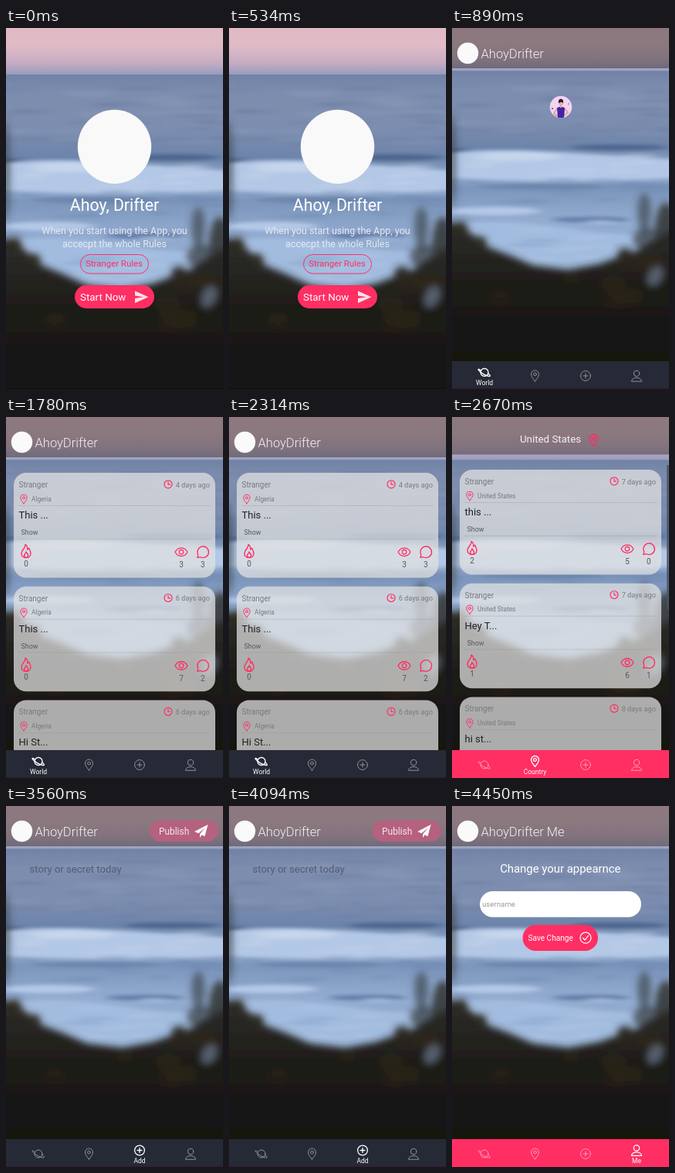
An HTML page for the animation above (5.34 s loop, 281 px wide and 466 px high).

```html
<!DOCTYPE html>
<html lang="en">
<head>
<meta charset="utf-8">
<title>App tour</title>
<style>
  html, body { margin: 0; width: 100%; height: 100%; overflow: hidden; background: #15130f; }
  svg { display: block; width: 100vw; height: 100vh; }
  text { font-family: Roboto, "Open Sans", sans-serif; }
</style>
</head>
<body>
<svg id="stage" viewBox="0 0 281 466" xmlns="http://www.w3.org/2000/svg">
  <defs>
    <linearGradient id="sky" x1="0" y1="0" x2="0" y2="1">
      <stop offset="0" stop-color="#e0b9c3"/>
      <stop offset=".35" stop-color="#e0bbc6"/>
      <stop offset=".7" stop-color="#c9aec3"/>
      <stop offset="1" stop-color="#939abd"/>
    </linearGradient>
    <linearGradient id="sea" x1="0" y1="0" x2="0" y2="1">
      <stop offset="0" stop-color="#7082a6"/>
      <stop offset=".08" stop-color="#7d8dae"/>
      <stop offset=".24" stop-color="#7d8eb0"/>
      <stop offset=".37" stop-color="#6d84aa"/>
      <stop offset=".47" stop-color="#98afd0"/>
      <stop offset=".58" stop-color="#7e97bd"/>
      <stop offset=".72" stop-color="#93acd0"/>
      <stop offset="1" stop-color="#8ca6cc"/>
    </linearGradient>
    <linearGradient id="land" x1="0" y1="0" x2="0" y2="1">
      <stop offset="0" stop-color="#2e2d2a"/>
      <stop offset=".35" stop-color="#1f1d19"/>
      <stop offset=".7" stop-color="#151412"/>
      <stop offset="1" stop-color="#121110"/>
    </linearGradient>
    <filter id="soft" filterUnits="userSpaceOnUse" x="-60" y="-20" width="400" height="540">
      <feGaussianBlur stdDeviation="7 2.2"/>
    </filter>
    <filter id="haze" filterUnits="userSpaceOnUse" x="-60" y="-20" width="400" height="560">
      <feGaussianBlur stdDeviation="5"/>
    </filter>
    <clipPath id="disc"><circle cx="141" cy="102" r="14"/></clipPath>
    <g id="photo"></g>
  </defs>
  <g id="scenes"></g>
</svg>
<script>
const HOLD = 890;
const PINK = '#ff2e63', NAVY = '#252a36';
const BRAND = 'AhoyDrifter';

const text = (x, y, size, str, fill = '#fff', more = '') =>
  `<text x="${x}" y="${y}" font-size="${size}" fill="${fill}" ${more}>${str}</text>`;
const mid = 'text-anchor="middle"', end = 'text-anchor="end"', thin = 'font-weight="300"';
const rect = (x, y, w, h, fill, r = 0, more = '') =>
  `<rect x="${x}" y="${y}" width="${w}" height="${h}" rx="${r}" fill="${fill}" ${more}/>`;
const oval = (x, y, rx, ry, fill, more = '') =>
  `<ellipse cx="${x}" cy="${y}" rx="${rx}" ry="${ry}" fill="${fill}" ${more}/>`;

// Icons are centred on 0,0
const shapes = {
  planet: '<circle r="5"/><path d="M-4.6-2.4C-7.5-4.6-8.6-4.6-7.6-2.8C-6-.2 1.5 4.4 5.6 5C8.4 5.4 7.6 3.4 4.8 1.2"/>',
  pin: '<path d="M0 7C-2.2 3.8-5 1.2-5-2A5 5 0 0 1 5-2C5 1.2 2.2 3.8 0 7Z"/><circle cy="-2" r="1.9"/>',
  add: '<circle r="6.4"/><path d="M-3 0H3M0-3V3"/>',
  user: '<circle cy="-3" r="3.7"/><path d="M-6.5 6.8C-6.5 1 6.5 1 6.5 6.8Z"/>',
  clock: '<circle r="5"/><path d="M0-3V.3H2.5"/>',
  fire: '<path d="M-1-8.5C0-4-6-2-6 3.2C-6 6.6-3.2 8.6 0 8.6S6 6.6 6 3C6 .2 4.4-1.4 3.8-3.6C3-2.6 2.4-2.2 1.8-1.8C2.2-5 1-7.4-1-8.5Z"/><path d="M0 1C.4 3-2.4 3.4-2.4 5.8C-2.4 7.4-1.2 8.4 0 8.4S2.6 7.4 2.6 5.6C2.6 3.6.8 3 0 1Z"/>',
  eye: '<path d="M-8 0C-4.5-7 4.5-7 8 0C4.5 7-4.5 7-8 0Z"/><circle r="2.8"/>',
  chat: '<path d="M-7 7.4L-6 3.6A7.3 7.3 0 1 1-3.2 6.4Z"/>',
  check: '<circle r="7"/><path d="M-3.4.2L-1 2.8L3.6-2.8"/>'
};
const icon = (name, x, y, color, scale = 1, weight = 1.2) =>
  `<g transform="translate(${x} ${y}) scale(${scale})" fill="none" stroke="${color}" stroke-width="${weight}" stroke-linejoin="round" stroke-linecap="round">${shapes[name]}</g>`;

function photo() {
  let seed = 11;
  const rnd = (a, b) => a + (b - a) * ((seed = seed * 16807 % 2147483647) / 2147483647);
  const streaks = (n, y0, y1, color, rx0, rx1, ry, alpha) => {
    let s = '';
    for (let i = 0; i < n; i++)
      s += oval(rnd(-10, 290), rnd(y0, y1), rnd(rx0, rx1), rnd(ry / 2, ry), color, `opacity="${alpha}"`);
    return s;
  };
  const water =
    streaks(26, 76, 160, '#627599', 12, 40, 2.2, .38) +
    streaks(20, 70, 150, '#98a6c4', 12, 40, 2, .34) +
    oval(8, 173, 22, 4, '#435a80') + oval(215, 167, 62, 4, '#4d658d') +
    // foam bands sag slightly to the right
    `<path fill="#b3c8e6" d="M-30 178Q40 168 110 172T310 186V208Q150 220-30 208Z"/>` +
    oval(85, 180, 55, 6, '#c6d6ec') +
    oval(120, 222, 90, 4, '#6b84ab') + oval(250, 222, 55, 5, '#7690b7') +
    oval(55, 256, 60, 6, '#b4c8e6') + oval(180, 268, 50, 4, '#5f7ba5') +
    `<path fill="#a2bcdf" d="M-30 274Q70 266 150 280T310 286V345H-30Z"/>` +
    streaks(12, 178, 206, '#c3d3ea', 10, 32, 3, .5) +
    streaks(14, 212, 245, '#6984ac', 10, 34, 2.5, .4) +
    streaks(14, 250, 325, '#b5cae8', 10, 32, 3, .45) +
    streaks(10, 262, 315, '#7692ba', 10, 30, 2.5, .4);
  const growth =
    oval(0, 185, 5, 65, '#38434b', 'opacity=".7"') +
    oval(249, 258, 9, 27, '#414c55', 'opacity=".75"') +
    oval(277, 278, 14, 34, '#343938', 'opacity=".9"') +
    oval(254, 295, 20, 15, '#363a3b', 'opacity=".7"') +
    `<path fill="url(#land)" d="M-30 270L8 272L24 286L46 306L75 318L105 332L150 338L190 330L214 321L238 312L256 300L281 284L310 276V520H-30Z"/>` +
    oval(12, 280, 8, 10, '#2d2a24') + oval(36, 300, 9, 9, '#2c2920') +
    oval(224, 316, 10, 8, '#2b2b28') +
    streaks(9, 325, 385, '#33291a', 10, 26, 12, .4) +
    oval(263, 347, 9, 14, '#7a8ba4', 'opacity=".6" transform="rotate(25 263 347)"');
  return rect(0, 0, 281, 62, 'url(#sky)') +
    rect(0, 60, 281, 290, 'url(#sea)') +
    `<g filter="url(#soft)">${water}</g><g filter="url(#haze)">${growth}</g>`;
}

const tabs = [['planet', 42, 'World'], ['pin', 107.5, 'Country'], ['add', 173, 'Add'], ['user', 239, 'Me']];
function tabBar(active, pink) {
  const idle = pink ? '#ff9db5' : '#8d929c';
  return rect(0, 430, 281, 36, pink ? PINK : NAVY) +
    (pink ? '' : rect(0, 465, 281, 1, '#38182f')) +
    tabs.map(([name, x, label], i) => i === active
      ? icon(name, x, 444.5, '#fff', 1, 1.3) + text(x, 461, 8.5, label, '#fff', mid)
      : icon(name, x, 449, idle, 1, 1)).join('');
}

const backdrop = (h = 52) => '<use href="#photo" transform="scale(1 .923)"/>' +
  rect(0, 0, 281, h, '#3a383a', 0, 'opacity=".5"') +
  (h > 50 ? rect(0, 52, 281, 2, '#a3acc4', 0, 'opacity=".6"') : '');
const brandBar = (suffix = '') =>
  oval(20.5, 32.5, 13.7, 13.7, '#fafafa') + text(37.5, 38.5, 16.5, BRAND + suffix, '#f4f1f3', thin);

function card(y, place, age, title, fires, views, replies) {
  const grey = '#777a7e', dark = '#55585c';
  const line = dy => rect(16, dy, 249, .7, '#8d9093', 0, 'opacity=".45"');
  return `<g transform="translate(0 ${y})">` +
    rect(10, 0, 261, 135.5, '#e2e2e2', 16, 'opacity=".74"') +
    text(16.5, 19, 10, 'Stranger', grey) +
    icon('clock', 210, 14.8, PINK) +
    text(264, 18.5, 9.2, age, grey, end) +
    icon('pin', 23, 34, PINK, .82) +
    text(33, 36.5, 8.3, place, grey) + line(42) +
    text(16.5, 59, 13, title, '#202226') +
    text(19.5, 80.3, 8.9, 'Show', dark) + line(85) +
    icon('fire', 26, 101, PINK, 1, 1.4) +
    icon('eye', 227, 102.3, PINK, 1, 1.3) +
    icon('chat', 254.8, 102.3, PINK, 1, 1.3) +
    text(26, 120.5, 10, fires, dark, mid) +
    text(227, 122, 10, views, dark, mid) +
    text(254.8, 122, 10, replies, dark, mid) + '</g>';
}
const feed = (top, place, rows) =>
  rows.map((row, i) => card(top + i * 146.7, place, ...row)).join('');

const avatar = oval(141, 102, 14.3, 14.3, '#f3d4f1') + `<g clip-path="url(#disc)">
  <path d="M136 104L132 110L137 115M146 104L150 109L145 113" fill="none" stroke="#dda596" stroke-width="2"/>
  <path d="M136 103Q141 100 146 103L145 117H137Z" fill="#4322a8"/>
  <rect x="139.8" y="98" width="2.5" height="5" fill="#dda596"/>
  <circle cx="141" cy="97" r="2.8" fill="#e3ad9e"/>
  <path d="M138 97Q137 92 141 91.5Q145 92 144 97Q142 94 138 97Z" fill="#241b32"/>
  <circle cx="130" cy="104" r=".9" fill="#4322a8"/><circle cx="151" cy="98" r=".7" fill="#4322a8"/></g>`;

const welcome = '<use href="#photo"/>' + rect(0, 465, 281, 1, '#1f050b') +
  oval(140.5, 153.3, 47.7, 47.7, '#f9f9f9') +
  text(140.5, 236, 21.3, 'Ahoy, Drifter', '#fff', mid) +
  text(140.5, 266, 12.5, 'When you start using the App, you', '#e6e9ef', mid) +
  text(140.5, 282.5, 12.5, 'accecpt the whole Rules', '#e6e9ef', mid) +
  rect(96.5, 292.5, 88, 24.5, 'none', 12.2, `stroke="${PINK}"`) +
  text(140, 308.3, 11.4, 'Stranger Rules', PINK, mid) +
  rect(89, 332, 103, 30, PINK, 15) +
  text(96, 352, 13.4, 'Start Now') +
  '<path d="M167 339.5L184.5 347.2L167 355V349L178 347.2L167 345.5Z" fill="#fbe3e9"/>';

const world = backdrop() + brandBar();

const scenes = [
  welcome,
  world + avatar + tabBar(0),
  world + feed(72, 'Algeria', [
    ['4 days ago', 'This ...', 0, 3, 3],
    ['6 days ago', 'This ...', 0, 7, 2],
    ['6 days ago', 'Hi St...', 0, 0, 0]
  ]) + tabBar(0),
  backdrop(48.5) + text(88, 33, 13.3, 'United States', '#f4f1f3') +
    icon('pin', 183.5, 30, PINK, 1.1, 1.3) +
    feed(68, 'United States', [
      ['7 days ago', 'this ...', 2, 5, 0],
      ['7 days ago', 'Hey T...', 1, 6, 1],
      ['8 days ago', 'hi st...', 0, 0, 0]
    ]) + rect(278, 62, 3, 186, '#4a5164', 0, 'opacity=".8"') + tabBar(1, true),
  world + rect(186, 18.5, 88.5, 27.5, '#b5617f', 13.7) +
    text(198, 37, 11.9, 'Publish', '#f6e6ec') +
    '<path d="M261.5 24L244 33L249.3 35.3L258 28L251 36.3V41L253.6 37.2L257.3 39.2Z" fill="#fff"/>' +
    text(30.5, 86, 13.1, 'story or secret today', '#545c70') + tabBar(2),
  backdrop() + brandBar(' Me') +
    text(140.3, 85.5, 14.9, 'Change your appearnce', '#fff', mid) +
    rect(36, 110, 209, 33.5, '#fff', 16.7) +
    text(39, 130, 9.7, 'username', '#999') +
    rect(91.5, 153.5, 97.5, 33.5, PINK, 16.7) +
    text(98.5, 174, 10.1, 'Save Change') +
    icon('check', 173, 170.2, '#fff') + tabBar(3, true)
];

document.getElementById('photo').innerHTML = photo();
const root = document.getElementById('scenes');
root.innerHTML = scenes.map(s => `<g display="none">${s}</g>`).join('');

let shown = -1;
function draw(ms) {
  const next = Math.floor(ms / HOLD) % scenes.length;
  if (next === shown) return;
  if (shown >= 0) root.children[shown].setAttribute('display', 'none');
  root.children[next].removeAttribute('display');
  shown = next;
}

let start;
function tick(now) {
  start ??= now;
  draw(Math.max(0, now - start));
  requestAnimationFrame(tick);
}
draw(0);
requestAnimationFrame(tick);
</script>
</body>
</html>
```
